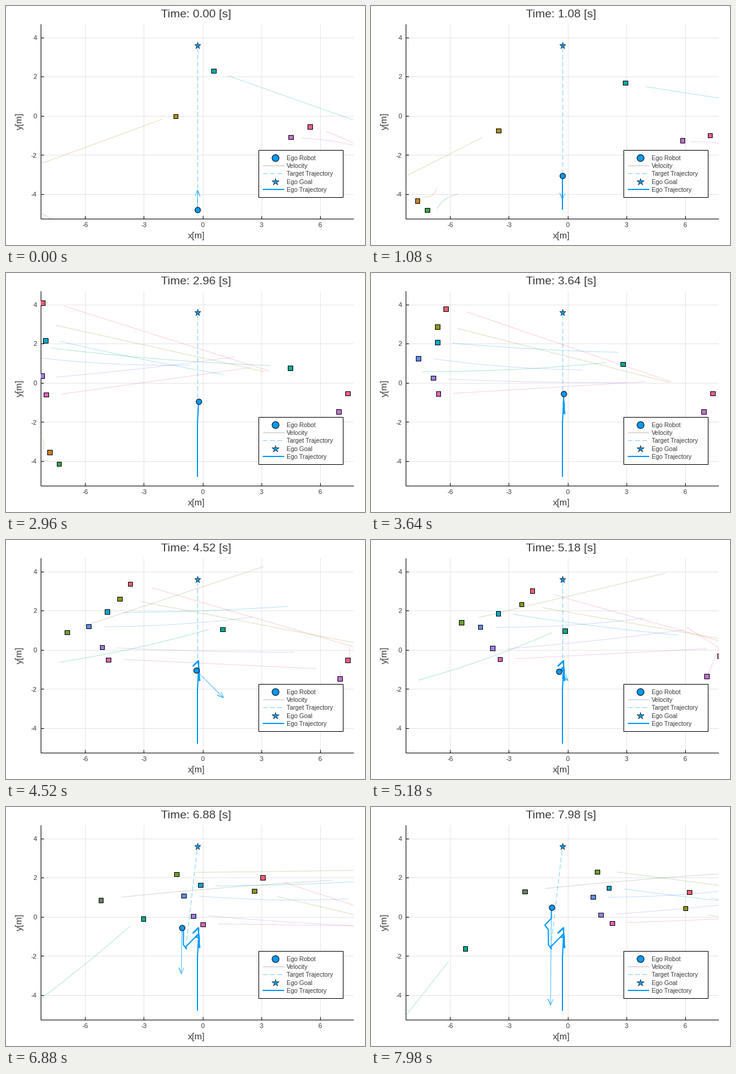
These frames come from a looping animation (600x400 px, 8000 ms). A matplotlib script:

```python
import numpy as np
import matplotlib.pyplot as plt
from matplotlib.animation import FuncAnimation
from matplotlib.collections import LineCollection
from matplotlib.patches import Rectangle

W, H, DPI = 600, 400, 100
FRAMES, STEP = 400, 20
LEFT, RIGHT, TOP, BOTTOM = 58.5, 581, 30, 356.5
UNIT, X0, Y0 = 32.75, 329, 184
PX = 72 / DPI  # points per pixel
HALF = 0.5     # pixel-centre shift
BLUE, INK = "#009AFA", "#3a3a3a"

plt.rcParams["font.family"] = "Liberation Sans"
plt.rcParams["lines.solid_capstyle"] = "butt"
fig = plt.figure(figsize=(W / DPI, H / DPI), dpi=DPI, facecolor="white")
# Data coordinates are stage pixels, y pointing down.
ax = fig.add_axes([(LEFT - HALF) / W, 1 - (BOTTOM - HALF) / H,
                   (RIGHT - LEFT) / W, (BOTTOM - TOP) / H])
ax.set_xlim(LEFT, RIGHT)
ax.set_ylim(BOTTOM, TOP)
ax.axis("off")


def stroke(xs, ys, color, width=1, **kw):
    return ax.plot(xs, ys, color=color, lw=width * PX, **kw)[0]


def label(x, y, text, size, **kw):
    return ax.text(x, y + HALF, text, fontsize=size * PX, color=INK, **kw)


def mark(x, y, shape, size, z):
    return ax.plot([x], [y], shape, ms=size * PX, mfc=BLUE, mec="black",
                   mew=(1 if shape == "o" else 0.6) * PX, zorder=z)[0]


def unit(angle):
    return np.array([np.cos(angle), np.sin(angle)])


S = np.linspace(0, 1, 24)[:, None]
HIDDEN = np.full((2, 2), np.nan)
LEAD = 0.38  # seconds between an agent and the start of its path
SWAY = 2.2   # rad/s of the heading's sway


class Agent:
    """Polynomial motion x, y since birth; the planned path points along
    aim + turn * age, swaying, and covers `reach` seconds of travel."""

    def __init__(self, color, born, x, y, aim, turn=0, sway=(0, 0), reach=4,
                 bow=0, stop=9, dies=9):
        self.color, self.born, self.dies, self.stop = color, born, dies, stop
        self.xy = [np.polynomial.Polynomial(c) for c in (x, y)]
        self.aim, self.turn, self.sway = aim, turn, sway
        self.reach, self.bow = reach, bow

    def at(self, t):
        age = t - self.born
        if age < 0 or t >= self.dies:
            return HIDDEN[0], HIDDEN
        tau = min(age, self.stop)
        p = np.array([c(tau) for c in self.xy])
        if age > self.stop:
            return p, HIDDEN
        v = np.array([c.deriv()(tau) for c in self.xy])
        heading = self.aim + self.turn * age + np.dot(
            self.sway, (np.sin(SWAY * t), np.cos(SWAY * t)))
        along, side = unit(heading), unit(heading + np.pi / 2)
        line = (p + LEAD * v + S * self.reach * np.hypot(*v) * along
                + 4 * S * (1 - S) * self.bow * side)
        return p, line


agents = [
    # early group
    Agent("#AC8E18", 0, (284, -56.9, -7.8), (185, 12.3, 9.15), 2.52, sway=(0.5, 0.27)),
    Agent("#00AAAE", 0, (347.5, 60, 11.5), (109, 20.3, -1.7), 0.2, sway=(0.08, 0.14)),
    Agent("#C371D2", 0, (476.5, 46.3, -4.73), (220, 4.7, 0.4), 0.17, -0.03,
          reach=2.5, bow=-4, stop=2.25, dies=4.3),
    Agent("#C371D2", 4.3, (558, 0, 4.3), (232.5, 0, -5.5), -1.68, 0.57),
    Agent("#ED5E93", 0, (508.5, 73.2, -17.6), (202.5, 21.3, -7.3), 0.4, -1.4,
          reach=2, stop=2.95, dies=4.3),
    Agent("#ED5E93", 4.3, (571, 0, 16), (202, 0, -9.4), -1.23, -1.53, reach=2.4),
    Agent("#C68225", 0, (30, 61.5, -15.8), (348, -22, 2), -1.49,
          sway=(0.72, -0.54), reach=0.8, bow=6),
    Agent("#3EA44E", 0, (20, 95.2, -24.3), (345, 0.5, -3), 0.7, -1.2, reach=1, bow=-5),
    # oncoming and main crowd
    Agent("#00A98D", 1.6, (617.7, -125, 16.8, -1.333), (178, -14.6, 0, 0.587),
          3.48, -0.19, reach=4.2, bow=-4),
    Agent("#F06073", 2.8, (46.7, 93.8), (48.5, 13.1, 1), 0.3, sway=(0.03, 0), reach=3.8),
    Agent("#8E971E", 2.8, (37.5, 86.5, 1.5), (86, 3.3, 2.5), 0.21, sway=(0.04, 0), reach=4.1),
    Agent("#00A9CC", 2.8, (56, 66), (112.5, 4.5), 0.075, sway=(0, 0.13), reach=4.2, bow=2),
    Agent("#618DF6", 2.8, (23.2, 67.2), (142, 1.7), 0, sway=(0.08, 0.03), reach=3.7, bow=4),
    Agent("#9B7FE9", 2.8, (50, 64.6), (171.3, 6.5, -0.9), -0.035, sway=(0.04, -0.09),
          reach=4.6, bow=2),
    Agent("#DD65B6", 2.8, (56.7, 66.9), (204.2, -1.8), -0.045, sway=(-0.03, -0.09), reach=4.8),
    # late arrivals
    Agent("#6C9F33", 3.9, (58.4, 69.9, 2.1), (173.4, -32.3, 4.05), -0.4, 0.13, reach=4.1),
    Agent("#6B8062", 5.4, (26.8, 89.4), (176, -13.2), -0.08, reach=3.9, bow=-2),
]

# Ego robot: time, x, y along an angular route
route = np.array([
    (0, 320.5, 341.5), (1.08, 320.5, 284), (2.24, 320.5, 258.5), (2.6, 320.5, 250),
    (2.95, 322.5, 215), (3.25, 324, 236), (3.64, 322, 202.5), (3.9, 313, 211.5),
    (4.1, 322, 203), (4.3, 323, 219), (4.52, 318, 218.5), (4.8, 322, 213),
    (5.9, 301, 234.5), (6.05, 302, 238), (6.2, 297, 231), (6.7, 297, 206),
    (7.1, 291, 198), (7.4, 302, 187), (7.98, 302, 168)])
# Velocity arrow: time, dx, dy
push = np.array([(0, 0, -33), (1.08, 0, 40), (2.24, 0, 0), (3.64, 0, 0),
                 (4.52, 46, 46), (5.5, 0, 0), (5.9, 0, 0), (7.98, -1.5, 164)])
GOAL, DETOUR, RETARGET = (320.5, 66.5), (301, 236), 5.4


def follow(keys, t):
    return np.array([np.interp(t, keys[:, 0], keys[:, c]) for c in (1, 2)])


def arrow(p, d):
    size = np.hypot(*d)
    if size < 3:
        return HIDDEN
    u = d / size
    n = np.array([-u[1], u[0]])
    tip, back = p + d, p + d - 10 * u
    return np.array([p, tip, back + 4.2 * n, tip, back - 4.2 * n])


# Grid, axes and labels
for v in range(-6, 7, 3):
    x = X0 + v * UNIT
    stroke([x, x], [TOP, BOTTOM], "#e5e5e5", zorder=0)
    stroke([x, x], [BOTTOM, BOTTOM - 5], "black", clip_on=False, zorder=1)
    label(x, 370, str(v), 11.1, ha="center", va="baseline")
for v in range(-4, 5, 2):
    y = Y0 - v * UNIT
    stroke([LEFT, RIGHT], [y, y], "#e5e5e5", zorder=0)
    stroke([LEFT, LEFT + 5], [y, y], "black", clip_on=False, zorder=1)
    label(52, y + 4, str(v), 11.1, ha="right", va="baseline")
stroke([LEFT, LEFT, RIGHT], [TOP, BOTTOM, BOTTOM], "black", clip_on=False, zorder=1)
label(318.5, 389.5, "x[m]", 15.3, ha="center", va="baseline")
label(30, 193, "y[m]", 15.3, ha="right", va="center", rotation=90)
title = label(318.5, 19, "", 19.5, ha="center", va="baseline")

# Moving parts
DASH = (0, (8, 4))
colors = [a.color for a in agents]
paths = ax.add_collection(LineCollection([], colors=colors, linewidths=PX, alpha=0.3, zorder=2),
                          autolim=False)
target = stroke([], [], BLUE, ls=DASH, alpha=0.5, zorder=3)
trail = stroke([], [], BLUE, 2, zorder=4)
speed = stroke([], [], BLUE, alpha=0.7, zorder=4)
boxes = ax.scatter(np.zeros(len(agents)), np.zeros(len(agents)), s=(7.6 * PX) ** 2,
                   marker="s", c=colors, edgecolors="black", linewidths=PX, zorder=5)
mark(*GOAL, "*", 11.5, 5)
ego = mark(0, 0, "o", 9.2, 6)

# Legend
ax.add_patch(Rectangle((422.5, 241), 140.5, 79.5, fc="white", ec="black", lw=PX, zorder=7))
names = ("Ego Robot", "Velocity", "Target Trajectory", "Ego Goal", "Ego Trajectory")
rows = 254.3 + 13.25 * np.arange(len(names))
for y, name in zip(rows, names):
    label(469.5, y + 3.7, name, 10.4, va="baseline", zorder=8)
mark(450, rows[0], "o", 11.5, 8)
stroke([429, 465], [rows[1]] * 2, "#c6bcc2", zorder=8)
stroke([429, 465], [rows[2]] * 2, BLUE, ls=DASH, alpha=0.5, zorder=8)
mark(450, rows[3], "*", 13, 8)
stroke([429, 465], [rows[4]] * 2, BLUE, 2, zorder=8)


def draw(i):
    t = i * STEP / 1000
    title.set_text(f"Time: {t:.2f} [s]")
    state = [a.at(t) for a in agents]
    boxes.set_offsets([p for p, _ in state])
    paths.set_segments([line for _, line in state])
    p = follow(route, t)
    done = route[route[:, 0] < t, 1:]
    trail.set_data(*np.vstack([done, p]).T)
    speed.set_data(*arrow(p, follow(push, t)).T)
    target.set_data(*zip(route[0, 1:] if t < RETARGET else DETOUR, GOAL))
    ego.set_data([p[0]], [p[1]])
    return boxes, paths, trail, speed, target, ego, title


anim = FuncAnimation(fig, draw, frames=FRAMES, interval=STEP, repeat=True, repeat_delay=0)
plt.show()
```
